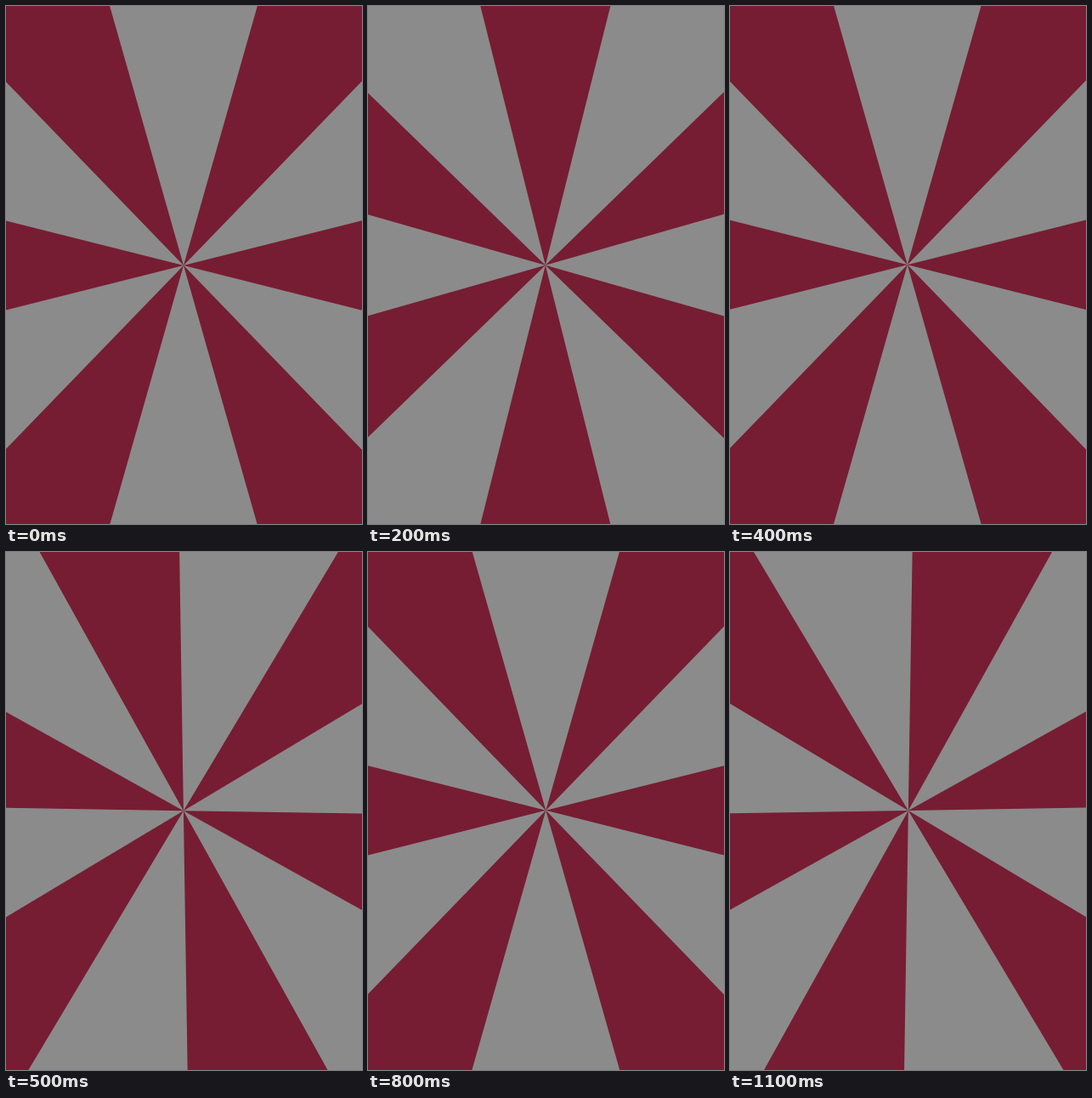
These frames come from a looping animation (419 px wide and 609 px high, 1.2 s). An HTML page with a canvas:

```html
<!DOCTYPE html>
<html lang="en">
<head>
<meta charset="utf-8">
<title>Spinning rays</title>
<style>
  html, body { margin: 0; width: 100%; height: 100%; overflow: hidden; background: #8b8b8b; }
  canvas { display: block; }
</style>
</head>
<body>
<canvas id="stage" width="419" height="609"></canvas>
<script>
const W = 419, H = 609, RAYS = 6, STEPS = 12, STEP_MS = 100;
const RAD = Math.PI / 180, HALF = 14.1 * RAD, REACH = 500;
const ctx = document.getElementById('stage').getContext('2d');

function draw(step) {
  ctx.resetTransform();
  ctx.fillStyle = '#8b8b8b';
  ctx.fillRect(0, 0, W, H);

  // The hub sits slightly off the pivot, so it wobbles as it turns.
  ctx.translate(W / 2, H / 2);
  ctx.rotate(step * 15 * RAD);
  ctx.translate(-0.5, 0.5);

  ctx.fillStyle = '#761d33';
  ctx.beginPath();
  for (let i = 0; i < RAYS; i++) {
    const mid = i * 2 * Math.PI / RAYS;
    ctx.moveTo(0, 0);
    ctx.arc(0, 0, REACH, mid - HALF, mid + HALF);
    ctx.closePath();
  }
  ctx.fill();
}

function tick() {
  draw(Math.floor(performance.now() / STEP_MS) % STEPS);
  requestAnimationFrame(tick);
}
tick();
</script>
</body>
</html>
```
